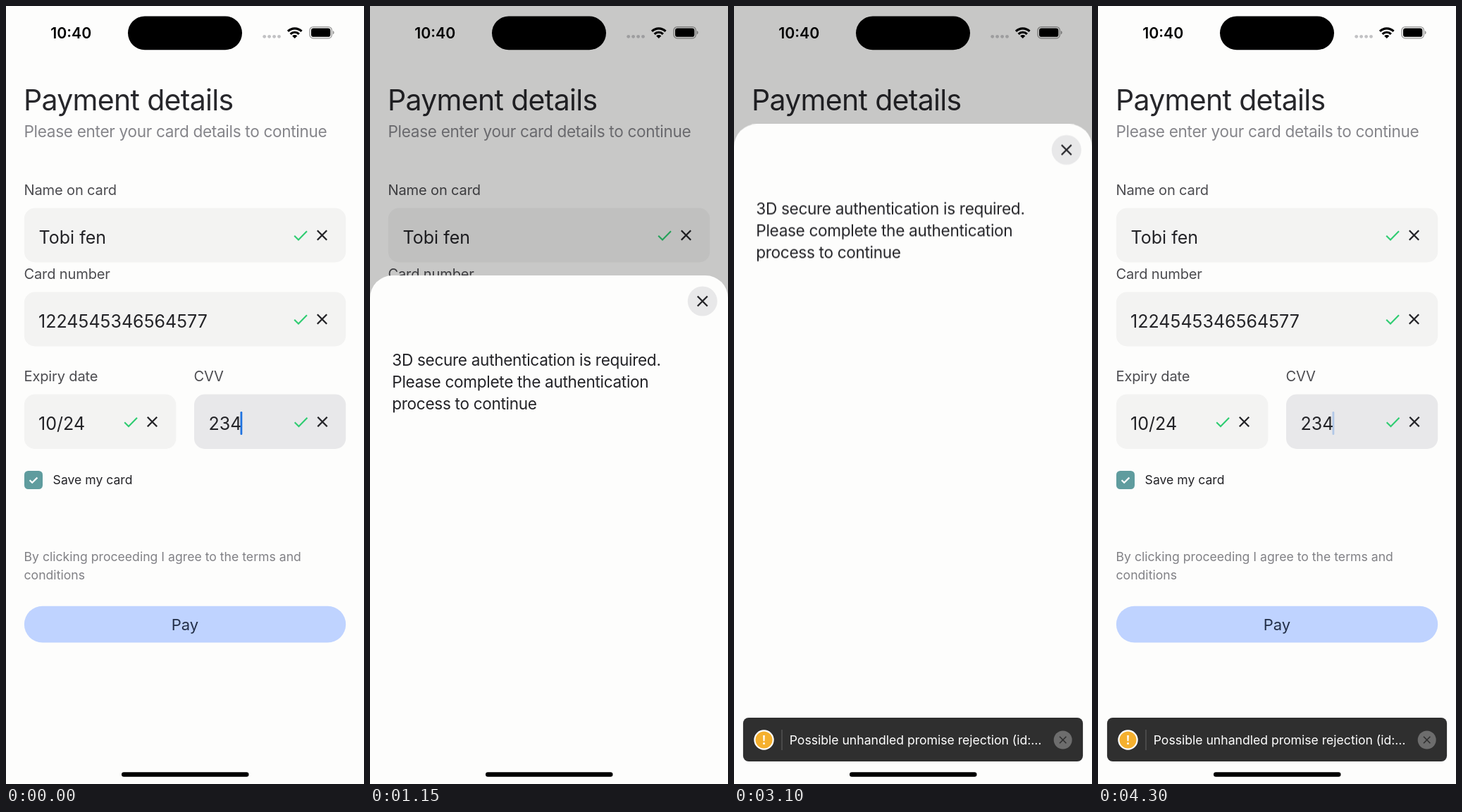
Write an HTML page that moves like this. It is 508 px wide and 1103 px high and loops after 4.35 s.

```html
<!DOCTYPE html>
<html lang="en">
<head>
<meta charset="utf-8">
<title>Payment details</title>
<style>
  html, body { margin: 0; width: 100%; height: 100%; overflow: hidden; background: #fdfdfc; }
  svg { display: block; width: 100vw; height: 100vh; }
  text { font-family: Inter, "Liberation Sans", sans-serif; font-optical-sizing: none; fill: #232327; }

  .time { font-size: 21.3px; font-weight: 600; fill: #000; }
  .title { font-size: 41px; letter-spacing: -.68px; fill: #27272b; }
  .sub { font-size: 22.6px; letter-spacing: -.32px; fill: #85858a; }
  .label { font-size: 20.1px; letter-spacing: -.17px; fill: #4c4c50; }
  .value { font-size: 25px; letter-spacing: .03px; }
  .small { font-size: 17.6px; }
  .terms { fill: #808085; letter-spacing: .02px; }
  .pay { font-size: 22px; fill: #232f48; text-anchor: middle; }
  .msg { font-size: 22.6px; letter-spacing: -.32px; }
  .light { fill: #fff; }

  .field { fill: #f3f3f2; }
  .focus { fill: #e8e8ea; }
  .line { fill: none; stroke: #232327; stroke-width: 2.3; }
  .ok { stroke: #2ecc71; stroke-width: 2.1; }

  .caret, .dim, .sheet, .toast { animation: 4350ms linear infinite; }
  .caret { fill: #1f72e0; animation-name: blink; }
  .dim { animation-name: dim; }
  .sheet { animation-name: slide; }
  .toast { animation-name: pop; }

  @keyframes blink {
    0%, 6.32% { opacity: 1; }
    10.34%, 14.48% { opacity: 0; }
    19.08%, 20.68% { opacity: 1; }
    20.69%, 78.15% { opacity: 0; }
    78.16%, 89.08% { opacity: 1; }
    93.1%, 97.24% { opacity: 0; }
    100% { opacity: .45; }
  }
  /* cubic ease-in-out, split at its midpoint */
  @keyframes slide {
    0% { transform: translateY(1103px); }
    20.529% { transform: translateY(1103px); animation-timing-function: cubic-bezier(.3333, 0, .6667, 0); }
    25.701% { transform: translateY(580px); animation-timing-function: cubic-bezier(.3333, 1, .6667, 1); }
    30.874% { transform: translateY(57px); }
    68.207% { transform: translateY(57px); animation-timing-function: cubic-bezier(.3333, 0, .6667, 0); }
    73.379% { transform: translateY(580px); animation-timing-function: cubic-bezier(.3333, 1, .6667, 1); }
    78.552%, 100% { transform: translateY(1103px); }
  }
  @keyframes dim {
    0% { opacity: 0; }
    19.31% { opacity: 0; animation-timing-function: cubic-bezier(.3333, 0, .6667, 0); }
    24.483% { opacity: .12; animation-timing-function: cubic-bezier(.3333, 1, .6667, 1); }
    29.655% { opacity: .24; }
    68.207% { opacity: .24; animation-timing-function: cubic-bezier(.3333, 0, .6667, 0); }
    73.379% { opacity: .12; animation-timing-function: cubic-bezier(.3333, 1, .6667, 1); }
    78.552%, 100% { opacity: 0; }
  }
  @keyframes pop {
    0% { opacity: 0; animation-timing-function: step-end; }
    52.874%, 100% { opacity: 1; }
  }
</style>
</head>
<body>
<svg viewBox="0 0 508 1103" preserveAspectRatio="none">
  <defs>
    <!-- origin is the centre of the clear cross -->
    <g id="marks">
      <path class="line ok" d="M-39.3 .8L-33.5 6.6L-21.5 -5.8"/>
      <path class="line" d="M-6.7 -6.7L6.7 6.7M6.7 -6.7L-6.7 6.7"/>
    </g>
  </defs>
  <rect width="508" height="1103" fill="#fdfdfc"/>

  <g id="form">
    <text class="title" x="25" y="148">Payment details</text>
    <text class="sub" x="25.5" y="186">Please enter your card details to continue</text>

    <text class="label" x="25.5" y="268">Name on card</text>
    <rect class="field" x="25.9" y="286.5" width="456.3" height="77" rx="15"/>
    <text class="value" x="46.5" y="337">Tobi fen</text>
    <use href="#marks" x="448.5" y="325"/>

    <text class="label" x="25.5" y="387">Card number</text>
    <rect class="field" x="25.9" y="405.5" width="456.3" height="77" rx="15"/>
    <text class="value" x="46" y="456">1224545346564577</text>
    <use href="#marks" x="448.5" y="444"/>

    <text class="label" x="25.5" y="532">Expiry date</text>
    <rect class="field" x="25.9" y="550.5" width="215.5" height="77.5" rx="15"/>
    <text class="value" x="46" y="601">10/24</text>
    <use href="#marks" x="207.5" y="589.5"/>

    <text class="label" x="266.5" y="532">CVV</text>
    <rect class="focus" x="267" y="550.5" width="215.2" height="77.5" rx="15"/>
    <text class="value" x="287.5" y="601">234</text>
    <rect class="caret" x="332.5" y="575" width="2.8" height="33" rx="1.2"/>
    <use href="#marks" x="449" y="589.5"/>

    <rect x="26" y="659" width="26" height="26" rx="5.5" fill="#5f9c9e"/>
    <path d="M33.6 672.2L37.2 675.8L44.4 668.6" fill="none" stroke="#fff" stroke-width="2.2"/>
    <text class="small" x="66.6" y="678.3">Save my card</text>

    <text class="small terms" x="25.5" y="787">By clicking proceeding I agree to the terms and</text>
    <text class="small terms" x="25.5" y="813">conditions</text>

    <rect x="25.9" y="850.8" width="456.3" height="51.7" rx="25.8" fill="#bfd3ff"/>
    <text class="pay" x="254" y="885">Pay</text>
  </g>

  <rect class="dim" width="508" height="1103" fill="#000"/>

  <g class="sheet">
    <path d="M0 1103V32A32 32 0 0 1 32 0H476A32 32 0 0 1 508 32V1103Z" fill="#fdfdfc"/>
    <circle cx="471.8" cy="36.5" r="21" fill="#e8e8e9"/>
    <path class="line" d="M464.8 29.5L478.8 43.5M478.8 29.5L464.8 43.5"/>
    <text class="msg" x="31.3" y="128">3D secure authentication is required.</text>
    <text class="msg" x="31.3" y="159">Please complete the authentication</text>
    <text class="msg" x="31.3" y="190">process to continue</text>
  </g>

  <g class="toast">
    <rect x="12.9" y="1009" width="482.2" height="62" rx="8" fill="#2f2f2f"/>
    <circle cx="42.5" cy="1040.5" r="14.2" fill="#fff"/>
    <circle cx="42.5" cy="1040.5" r="12" fill="#f5b02e"/>
    <path d="M41.2 1034H43.8L43.4 1042.3H41.6Z" fill="#fff"/>
    <circle cx="42.5" cy="1045.4" r="1.5" fill="#fff"/>
    <path d="M68 1026V1055" stroke="#5c5c5c" stroke-width="1.2"/>
    <text class="small light" x="78.7" y="1047">Possible unhandled promise rejection (id:…</text>
    <circle cx="466.7" cy="1040.5" r="13" fill="#6d6d6d"/>
    <path d="M462 1035.8L471.4 1045.2M471.4 1035.8L462 1045.2" stroke="#2f2f2f" stroke-width="1.6"/>
  </g>

  <g id="system">
    <text class="time" x="63.2" y="46">10:40</text>
    <rect x="173" y="14.4" width="162" height="47.8" rx="23.9"/>
    <g fill="#3c3c43" fill-opacity=".3">
      <circle cx="366.7" cy="43.3" r="2.4"/>
      <circle cx="373.6" cy="43.3" r="2.4"/>
      <circle cx="380.6" cy="43.3" r="2.4"/>
      <circle cx="387.5" cy="43.3" r="2.4"/>
    </g>
    <path d="M400 35.9A13.8 13.8 0 0 1 419.5 35.9M403.65 39.8A8.6 8.6 0 0 1 415.85 39.8" fill="none" stroke="#000" stroke-width="3.2"/>
    <path d="M409.75 46L406.2 42.6A5 5 0 0 1 413.3 42.6Z"/>
    <rect x="431" y="29.6" width="31.4" height="16.2" rx="5" fill="none" stroke="#000" stroke-opacity=".4" stroke-width="1.3"/>
    <rect x="433" y="31.6" width="27.4" height="12.2" rx="3.4"/>
    <path d="M463.9 35V40.4A3 3 0 0 0 463.9 35Z" fill-opacity=".45"/>
    <rect x="164" y="1086.2" width="180.5" height="6.5" rx="3.2"/>
  </g>
</svg>
</body>
</html>
```
